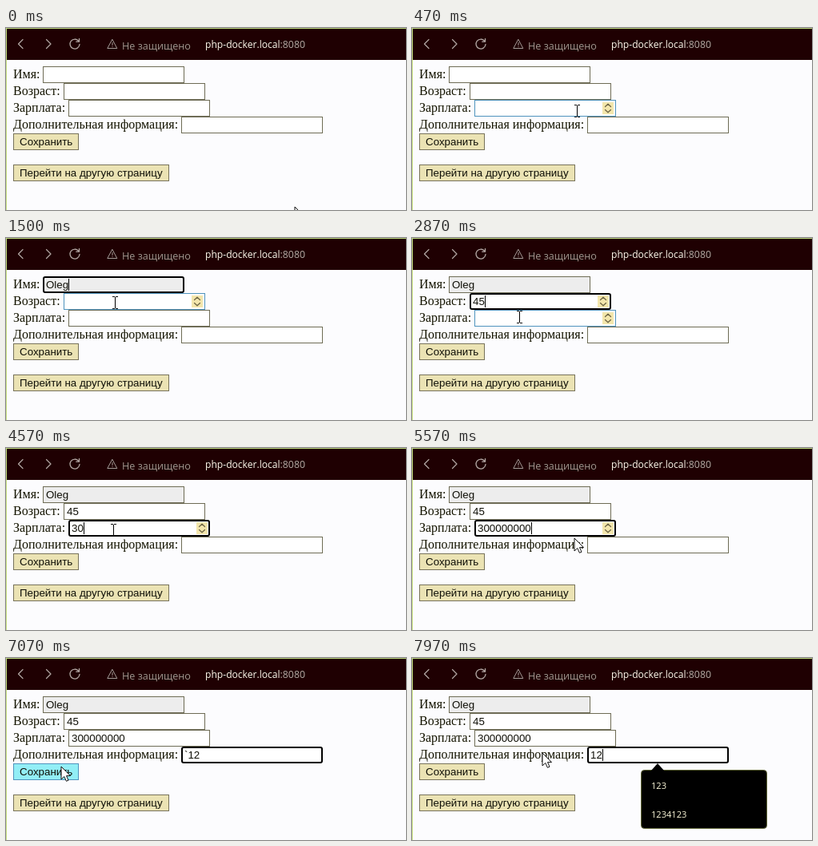
Recreate the animation shown at these times as an HTML page. Size 500 px wide and 228 px high, loop 8000 ms.

```html
<!DOCTYPE html>
<html lang="ru">
<head>
<meta charset="utf-8">
<title>Форма</title>
<style>
html, body { margin: 0; width: 100%; height: 100%; overflow: hidden; background: #fcfcfe; }
svg { display: block; width: 100vw; height: 100vh; }
.ui { font-family: "Open Sans", "Noto Sans", sans-serif; }
.serif { font: 16px "Liberation Serif", "Times New Roman", serif; fill: #141400; }
.form { font: 13.333px "Liberation Sans", Arial, sans-serif; fill: #101008; }
.item { font-size: 11.1px; font-weight: 500; fill: #fffbdc; }
.line { fill: none; stroke-linecap: round; stroke-linejoin: round; }
</style>
</head>
<body>
<svg id="stage" viewBox="0 0 500 228" xmlns="http://www.w3.org/2000/svg"></svg>
<script>
const LOOP = 8000, BLINK = 500;
const stage = document.getElementById('stage');

function add(tag, attrs, parent = stage, text) {
  const el = document.createElementNS(stage.namespaceURI, tag);
  set(el, attrs);
  if (text !== undefined) el.textContent = text;
  parent.appendChild(el);
  return el;
}
function set(el, attrs) {
  for (const k in attrs) el.setAttribute(k, attrs[k]);
}
const show = (el, on) => el.setAttribute('visibility', on ? 'visible' : 'hidden');
const line = (d, stroke, width, parent) =>
  add('path', { d, stroke, 'stroke-width': width, class: 'line' }, parent);

// Browser bar
add('rect', { width: 500, height: 228, fill: '#fcfcfe' });
add('rect', { width: 500, height: 40, fill: '#1f0002' });
add('rect', { width: 500, height: 1, fill: '#b9d67c' });
add('rect', { width: 1, height: 228, fill: '#c3dc7c' });
line('M21 14.5L15.5 20L21 25.5', '#b3a7a4', 1.2);
line('M50.5 14.5L56 20L50.5 25.5', '#b3a7a4', 1.2);
line('M90.8 16.4A6 6 0 1 0 92 20.5M91.5 13.5V17.2H87.8', '#b3a7a4', 1.3);
line('M133 14.5L138.8 25.5H127.2ZM133 18.5V21.6M133 23.4V23.6', '#a39a96', 1);
add('text', { x: 145, y: 27, class: 'ui', 'font-size': 12.6, fill: '#a0968f' }, stage, 'Не защищено');
const url = add('text', { x: 249, y: 25, class: 'ui', 'font-size': 12.3 });
add('tspan', { fill: '#fffdf0', 'font-weight': 500, 'font-size': 12.1 }, url, 'php-docker.local');
add('tspan', { fill: '#b5aca6' }, url, ':8080');

// Form
function makeField(label, x, y, numeric) {
  add('text', { x: 9, y: y + 15, class: 'serif' }, stage, label);
  const box = add('rect', {});
  const text = add('text', { x: x + 4, y: y + 15, class: 'form' });
  const caret = add('rect', { y: y + 3, width: 1, height: 15, fill: '#000' });
  let spin = null;
  if (numeric) {
    spin = add('g', {});
    add('rect', { x: x + 160, y: y + 3, width: 14, height: 15, fill: '#f3e6ac' }, spin);
    line(`M${x + 163.5} ${y + 8.5}l3.5 -3.2l3.5 3.2M${x + 163.5} ${y + 12.5}l3.5 3.2l3.5 -3.2`, '#6d6544', 1.3, spin);
  }
  return { x, y, w: 177, h: 21, box, text, caret, spin };
}
const fields = [
  makeField('Имя:', 46, 48),
  makeField('Возраст:', 72, 69, true),
  makeField('Зарплата:', 78, 90, true),
  makeField('Дополнительная информация:', 219, 111)
];

function makeButton(label, y, w) {
  const box = add('rect', { x: 9.5, y: y + .5, width: w - 1, height: 20 });
  add('text', { x: 17, y: y + 15, class: 'form' }, stage, label);
  return { x: 9, y, w, h: 21, box };
}
const buttons = [makeButton('Сохранить', 132, 82), makeButton('Перейти на другую страницу', 171, 195)];

// Suggestion popups
function makePopup(x, y, w, tip, items) {
  const g = add('g', { class: 'ui' });
  const box = add('rect', { x: x + .5, y: y + .5, width: w - 1, rx: 4, fill: '#000', stroke: '#5d6334' }, g);
  add('path', { d: `M${tip - 8} ${y + 1}L${tip} ${y - 8}L${tip + 8} ${y + 1}Z`, fill: '#000' }, g);
  const mark = add('rect', { x: x + 1, y: y + 2, width: w - 2, height: 36, fill: '#3a3a36', visibility: 'hidden' }, g);
  const texts = items.map((s, i) => add('text', { x: x + 13, y: y + 24 + 36 * i, class: 'item' }, g, s));
  return { g, box, mark, texts };
}
const names = makePopup(113, 77, 158, 134, ['Oleg', 'Матвей', 'lunokotik', 'Матвей Дроздюнко']);
const notes = makePopup(286, 140, 158, 307, ['123', '1234123', '12124142']);

function setPopup(p, rows) {
  show(p.g, rows > 0);
  p.box.setAttribute('height', 1 + 36 * rows);
  p.texts.forEach((t, i) => t.setAttribute('visibility', i < rows ? 'inherit' : 'hidden'));
}

// Pointers
const arrow = add('path', {
  d: 'M0 0V16L3.8 12.5L6.4 18.3L9 17.2L6.5 11.6H11.5Z',
  fill: '#fff', stroke: '#111', 'stroke-width': 1, 'stroke-linejoin': 'round'
});
const beam = add('path', {
  d: 'M-3 -7.5H0M1 -7.5H4M.5 -7V7M-3 7.5H0M1 7.5H4', fill: 'none', stroke: '#000'
});

// Timeline: [ms, value]
const focus = [[0, -1], [770, 0], [1600, 1], [3000, 2], [5870, 3]];
const keys = [
  [[0, ''], [1200, 'Oleg']],
  [[0, ''], [2330, '4'], [2500, '45']],
  [[0, ''], [4170, '3'], ...[4570, 4700, 4870, 4970, 5100, 5270, 5430, 5570].map((t, i) => [t, '3' + '0'.repeat(i + 1)])],
  [[0, ''], [6300, '`'], [6370, '`1'], [6450, '`12'], [7630, '`1'], [7700, '`'], [7770, ''], [7930, '1'], [7965, '12']]
];
const nameRows = [[0, 0], [770, 5], [1200, 0]];
const noteRows = [[0, 0], [5970, 3], [6300, 0], [7930, 3], [7965, 2]];
const path = [
  [0, 361, 224], [30, 361, 224], [700, 149, 59], [860, 149, 62], [900, 149, 74], [1030, 147, 97],
  [1200, 147, 97], [1560, 135, 80], [2550, 135, 80], [2820, 134, 99], [3150, 134, 99],
  [3200, 134, 103], [5430, 134, 103], [5730, 285, 124], [5850, 285, 124], [5900, 285, 127],
  [6370, 285, 127], [6930, 72, 139], [7030, 69, 136], [7080, 69, 136], [7270, 163, 119], [8000, 163, 119]
];

function last(list, t) {
  let cur = list[0];
  for (const e of list) if (e[0] <= t) cur = e;
  return cur;
}
function pointer(t) {
  const i = path.findIndex(p => p[0] > t), a = path[i - 1], b = path[i];
  const u = (t - a[0]) / (b[0] - a[0]), e = u * u * (3 - 2 * u);
  return [1, 2].map(k => Math.round(a[k] + (b[k] - a[k]) * e));
}
const inside = (r, x, y) => x >= r.x && x < r.x + r.w && y >= r.y && y < r.y + r.h;

function frame(f, focused, hover) {
  const inset = focused ? 1 : .5;
  set(f.box, {
    x: f.x + inset, y: f.y + inset, width: f.w - 2 * inset, height: f.h - 2 * inset,
    rx: focused ? 2 : 0, 'stroke-width': 2 * inset,
    stroke: focused ? '#000' : hover ? '#4f93bd' : '#6e6c55'
  });
}

function render(t) {
  const [x, y] = pointer(t);
  const [focusAt, active] = last(focus, t);
  const nRows = last(nameRows, t)[1], iRows = last(noteRows, t)[1];
  const blocked = (nRows && y > 68) || (iRows && y > 132 && x > 286);
  const preview = nRows > 0 && y > 79;
  let overField = false;

  fields.forEach((f, i) => {
    const [keyAt, typed] = last(keys[i], t);
    const value = i === 0 && preview ? 'Oleg' : typed;
    const on = i === active, hover = !blocked && inside(f, x, y);
    overField = overField || hover;
    frame(f, on, hover);
    f.box.setAttribute('fill', i === 0 && value ? '#ededed' : '#fff');
    if (f.text.textContent !== value) f.text.textContent = value;
    const since = t - Math.max(focusAt, keyAt);
    show(f.caret, on && !preview && Math.floor(since / BLINK) % 2 === 0);
    f.caret.setAttribute('x', Math.round(f.x + 4 + (value ? f.text.getComputedTextLength() : 0)));
    if (f.spin) show(f.spin, on || hover);
  });

  for (const b of buttons) {
    const hover = !blocked && inside(b, x, y);
    set(b.box, { fill: hover ? '#92eef6' : '#ebe3b4', stroke: hover ? '#4f93bd' : '#77725a' });
  }

  setPopup(names, nRows);
  setPopup(notes, iRows);
  names.mark.setAttribute('visibility', preview ? 'inherit' : 'hidden');

  show(arrow, !overField);
  show(beam, overField);
  for (const p of [arrow, beam]) p.setAttribute('transform', `translate(${x} ${y})`);
}

const start = performance.now();
function tick() {
  render((performance.now() - start) % LOOP);
  requestAnimationFrame(tick);
}
tick();
</script>
</body>
</html>
```
